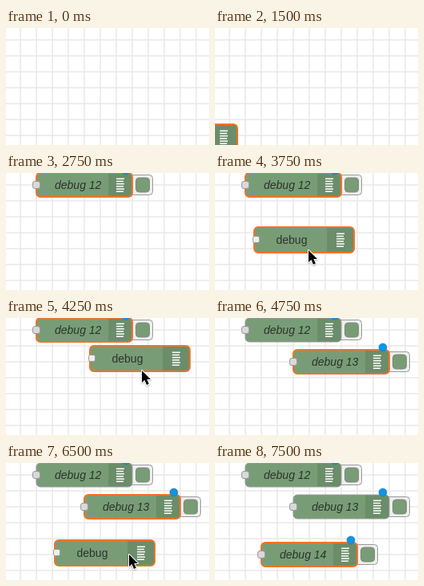
Write an HTML page with a canvas that moves like this. It is 254 px wide and 147 px high and loops after 8500 ms.

```html
<!DOCTYPE html>
<html lang="en">
<head>
<meta charset="utf-8">
<title>Debug nodes</title>
<style>
html, body { margin: 0; width: 100%; height: 100%; overflow: hidden; background: #fff; }
canvas { display: block; width: 254px; height: 147px; }
</style>
</head>
<body>
<canvas id="stage"></canvas>
<script>
const W = 254, H = 147, LOOP = 8500;
const GREEN = '#789d76', ORANGE = '#f47126', GREY = '#999';
const canvas = document.getElementById('stage');
const ctx = canvas.getContext('2d');
const scale = window.devicePixelRatio || 1;
canvas.width = Math.round(W * scale);
canvas.height = Math.round(H * scale);

// Placed nodes, each with the span during which it is selected.
const nodes = [
  { x: 38, y: 0, label: 'debug 12', from: 2250, to: 4500 },
  { x: 98, y: 40, label: 'debug 13', from: 4500, to: 6750 },
  { x: 58, y: 100, label: 'debug 14', from: 6750, to: LOOP }
];

const steps = [
  { at: 0 },
  { at: 1500, drag: [-98, 120] },
  { at: 1750, drag: [7, 32], tip: [60, 54] },
  { at: 2000, drag: [41, 7], tip: [94, 30] },
  { at: 2250, tip: [94, 30] },
  { at: 2500, tip: [32.5, 74] },
  { at: 2750 },
  { at: 3750, drag: [48, 67], tip: [117, 97] },
  { at: 4000, drag: [77, 44], tip: [145, 72] },
  { at: 4250, drag: [104, 34], tip: [170, 66] },
  { at: 4500, tip: [170, 66] },
  { at: 4750 },
  { at: 6000, drag: [49, 113], tip: [143.5, 127] },
  { at: 6250, drag: [63, 102], tip: [157, 121] },
  { at: 6500, drag: [60, 96], tip: [154, 115] },
  { at: 6750 }
];

function box(x, y, w, h, r, fill, stroke, line = 1) {
  ctx.beginPath();
  ctx.roundRect(x, y, w, h, r);
  if (fill) {
    ctx.fillStyle = fill;
    ctx.fill();
  }
  if (stroke) {
    ctx.strokeStyle = stroke;
    ctx.lineWidth = line;
    ctx.stroke();
  }
}

function grid() {
  ctx.fillStyle = '#e9e9e9';
  for (let x = 17.25; x < W; x += 20) ctx.fillRect(x, 0, 1.5, H);
  for (let y = 14.25; y < H; y += 20) ctx.fillRect(0, y, W, 1.5);
}

function bars(cx, cy) {
  ctx.fillStyle = '#fff';
  for (let i = 0; i < 6; i++) {
    ctx.fillRect(cx - 5, cy - 8.5 + i * 3.2, i % 2 ? 9 : 10, 1.5);
  }
}

function body(x, y, w, h, icon, stroke, line) {
  box(x, y, w, h, 5, GREEN);
  box(x + w - icon, y, icon, h, [0, 5, 5, 0], 'rgba(0,0,0,0.1)');
  bars(x + w - icon / 2, y + h / 2);
  box(x, y, w, h, 5, null, stroke, line);
}

function label(text, x, y, style) {
  ctx.font = style + ' 14px "Liberation Sans", Arial, sans-serif';
  ctx.fillStyle = '#2c332c';
  ctx.fillText(text, x, y);
}

function placedNode({ x, y, label: text }, selected) {
  box(x + 114.5, y + 2.5, 31, 25, 4, '#eee', GREY);
  box(x + 124.5, y + 6, 17, 18, 4, GREEN, '#7d887c');
  body(x, y, 120, 30, 30, selected ? ORANGE : GREY, selected ? 2 : 1);
  box(x - 4.5, y + 10.5, 9, 9, 2.5, '#d9d9d9', GREY);
  label(text, x + 23, y + 20, 'italic');
  ctx.beginPath();
  ctx.arc(x + 112, y - 3, 5, 0, 7);
  ctx.fillStyle = '#0d95e8';
  ctx.fill();
  ctx.strokeStyle = '#1a7cc0';
  ctx.lineWidth = 0.7;
  ctx.stroke();
}

function draggedNode([x, y]) {
  body(x + 1, y + 1, 125, 32, 34, ORANGE, 2);
  box(x - 0.5, y + 12.5, 8, 8, 2, '#eee', GREY);
  label('debug', x + 28.5, y + 21.5, 'normal');
}

function pointer([x, y]) {
  ctx.save();
  ctx.translate(x, y);
  ctx.beginPath();
  [[0, 0], [0, 15], [3.5, 12], [6, 18], [8.8, 16.8], [6.3, 11], [11, 11]]
    .forEach(p => ctx.lineTo(...p));
  ctx.closePath();
  ctx.lineJoin = 'round';
  ctx.lineWidth = 2;
  ctx.strokeStyle = '#fff';
  ctx.shadowColor = 'rgba(0,0,0,0.3)';
  ctx.shadowBlur = 2 * scale;
  ctx.shadowOffsetY = scale;
  ctx.stroke();
  ctx.shadowColor = 'transparent';
  ctx.fillStyle = '#000';
  ctx.fill();
  ctx.restore();
}

function draw(t) {
  const step = steps.findLast(s => s.at <= t);
  ctx.setTransform(scale, 0, 0, scale, 0, 0);
  ctx.fillStyle = '#fff';
  ctx.fillRect(0, 0, W, H);
  grid();
  for (const n of nodes) {
    if (t >= n.from) placedNode(n, t < n.to);
  }
  if (step.drag) draggedNode(step.drag);
  if (step.tip) pointer(step.tip);
}

const start = performance.now();
function tick() {
  draw((performance.now() - start) % LOOP);
  requestAnimationFrame(tick);
}
tick();
</script>
</body>
</html>
```
